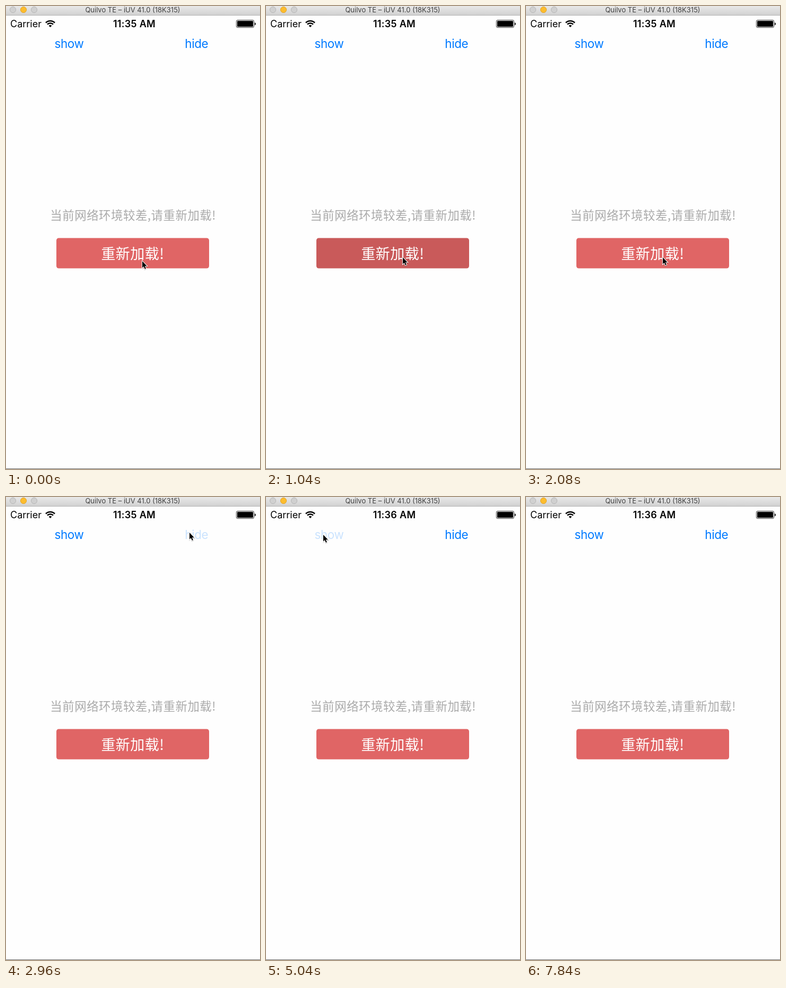
Recreate the animation shown at these times as an HTML page. Size 479 by 871 pixels, loop 8.29 s.

```html
<!DOCTYPE html>
<html lang="zh">
<head>
<meta charset="utf-8">
<title>Reload prompt</title>
<style>
  html, body { margin: 0; width: 100%; height: 100%; overflow: hidden; background: #fefefe; }
  svg { display: block; width: 479px; height: 871px; }
  text { font-family: Inter, "Open Sans", sans-serif; text-anchor: middle; }
  .cjk { font-family: "Noto Sans CJK SC", "Noto Sans CJK", sans-serif; letter-spacing: .5px; }
  .link { font-size: 22.45px; letter-spacing: -.4px; fill: #007aff; }
</style>
</head>
<body>
<svg viewBox="0 0 479 871">
  <defs>
    <linearGradient id="bar" x2="0" y2="1">
      <stop stop-color="#e9e9e9"/><stop offset="1" stop-color="#d1d1d1"/>
    </linearGradient>
    <filter id="shadow" x="-50%" y="-50%" width="200%" height="200%">
      <feDropShadow dx="0" dy="1" stdDeviation=".7" flood-opacity=".3"/>
    </filter>
  </defs>

  <rect width="479" height="871" fill="#fefefe"/>

  <!-- window title bar -->
  <rect width="479" height="17" fill="url(#bar)"/>
  <rect y="17" width="479" height="1" fill="#b4b4b4"/>
  <g fill="#d0d0d0" stroke="#b6b6b6">
    <circle cx="13" cy="7" r="5.6"/>
    <circle cx="33" cy="7" r="5.6" fill="#fdbd2e" stroke="#e0a32c"/>
    <circle cx="53" cy="7" r="5.6"/>
  </g>
  <text x="239" y="12" font-size="13" fill="#3f3f3f">Quilvo TE – iUV 41.0 (18K315)</text>

  <!-- status bar -->
  <text x="37.5" y="40" font-size="18">Carrier</text>
  <g transform="translate(83.5 40)" fill="none" stroke="#000" stroke-width="2.6">
    <path d="M-8.5-8.5A12 12 0 0 1 8.5-8.5M-5.5-5.5A7.8 7.8 0 0 1 5.5-5.5"/>
    <path d="M0 0L-2.9-2.9A4.1 4.1 0 0 1 2.9-2.9Z" fill="#000" stroke="none"/>
  </g>
  <text id="clock" x="242" y="40" font-size="18" font-weight="600" letter-spacing=".3"></text>
  <rect x="434.4" y="26.5" width="33.2" height="14" rx="2.5" fill="none" stroke="#000" stroke-width=".8"/>
  <rect x="436" y="28" width="30" height="11" rx="1.2"/>
  <path d="M469 31Q471 31.5 471 33.5T469 36.5Z"/>

  <text id="show" class="link" x="119" y="79">show</text>
  <text id="hide" class="link" x="359.3" y="79">hide</text>

  <g id="prompt">
    <text class="cjk" x="239.7" y="402" font-size="22.45" fill="#aaa">当前网络环境较差,请重新加载!</text>
    <rect id="button" x="95" y="436.5" width="288" height="57" rx="4.5"/>
    <text class="cjk" x="239" y="475.5" font-size="27" fill="#fff">重新加载!</text>
  </g>

  <rect y="870" width="479" height="1" fill="#6e6e6e"/>

  <g id="cursor" filter="url(#shadow)">
    <path d="M1 2V14.6L3.8 12L5.9 16.8L7.9 15.9L5.9 11.2H9.8Z"
          stroke="#fff" stroke-width="1.8" paint-order="stroke"/>
  </g>
</svg>
<script>
// The screen is sampled at a fixed rate; all times below count these ticks.
const LOOP = 8290, TICK = 148, LEAD = 10;

// Press and release ticks of every click.
const clicks = {
  button: [[1, 3], [7, 8], [9, 14]],
  hide: [[20, 21], [27, 28]],
  show: [[33, 34], [39, 39], [42, 44]]
};

// Stops of the pointer, joined by eased moves.
const stops = [
  { at: 0, x: 256, y: 478 },
  { at: 3, x: 257, y: 471 },
  { at: 14, x: 257, y: 471 },
  { at: 18, x: 344, y: 51 },
  { at: 20, x: 345, y: 65 },
  { at: 27, x: 346, y: 66 },
  { at: 31, x: 66, y: 76 },
  { at: 33, x: 107, y: 69 },
  { at: 45, x: 107, y: 69 },
  { at: 52, x: 431, y: 867 },
  { at: 53, x: 431, y: 900 }
];

const part = id => document.getElementById(id);
const clamp = (v, low, high) => Math.min(high, Math.max(low, v));
const ease = p => p * p * (3 - 2 * p);

function pointerAt(tick) {
  const next = stops.find(s => s.at > tick);
  if (!next) return stops.at(-1);
  const last = stops[stops.indexOf(next) - 1];
  const p = ease((tick - last.at) / (next.at - last.at));
  return { x: last.x + (next.x - last.x) * p, y: last.y + (next.y - last.y) * p };
}

const isDown = (id, tick) => clicks[id].some(([down, up]) => tick >= down && tick < up);

// A pressed link dims at once and fades back over two ticks.
function linkOpacity(id, tick) {
  const click = clicks[id].findLast(([down]) => down <= tick);
  return click ? .2 + .4 * clamp(tick - click[1], 0, 2) : 1;
}

function draw() {
  const tick = Math.floor((performance.now() % LOOP + LEAD) / TICK);
  const { x, y } = pointerAt(tick);
  part("cursor").setAttribute("transform", `translate(${Math.round(x)} ${Math.round(y)})`);
  part("button").setAttribute("fill", isDown("button", tick) ? "#c95a5a" : "#e06565");
  for (const id of ["show", "hide"]) part(id).setAttribute("opacity", linkOpacity(id, tick));

  const hidden = tick >= clicks.hide[0][1] && tick < clicks.show[0][1];
  part("prompt").setAttribute("visibility", hidden ? "hidden" : "visible");
  part("clock").textContent = tick < 30 ? "11:35 AM" : "11:36 AM";
  requestAnimationFrame(draw);
}
draw();
</script>
</body>
</html>
```
